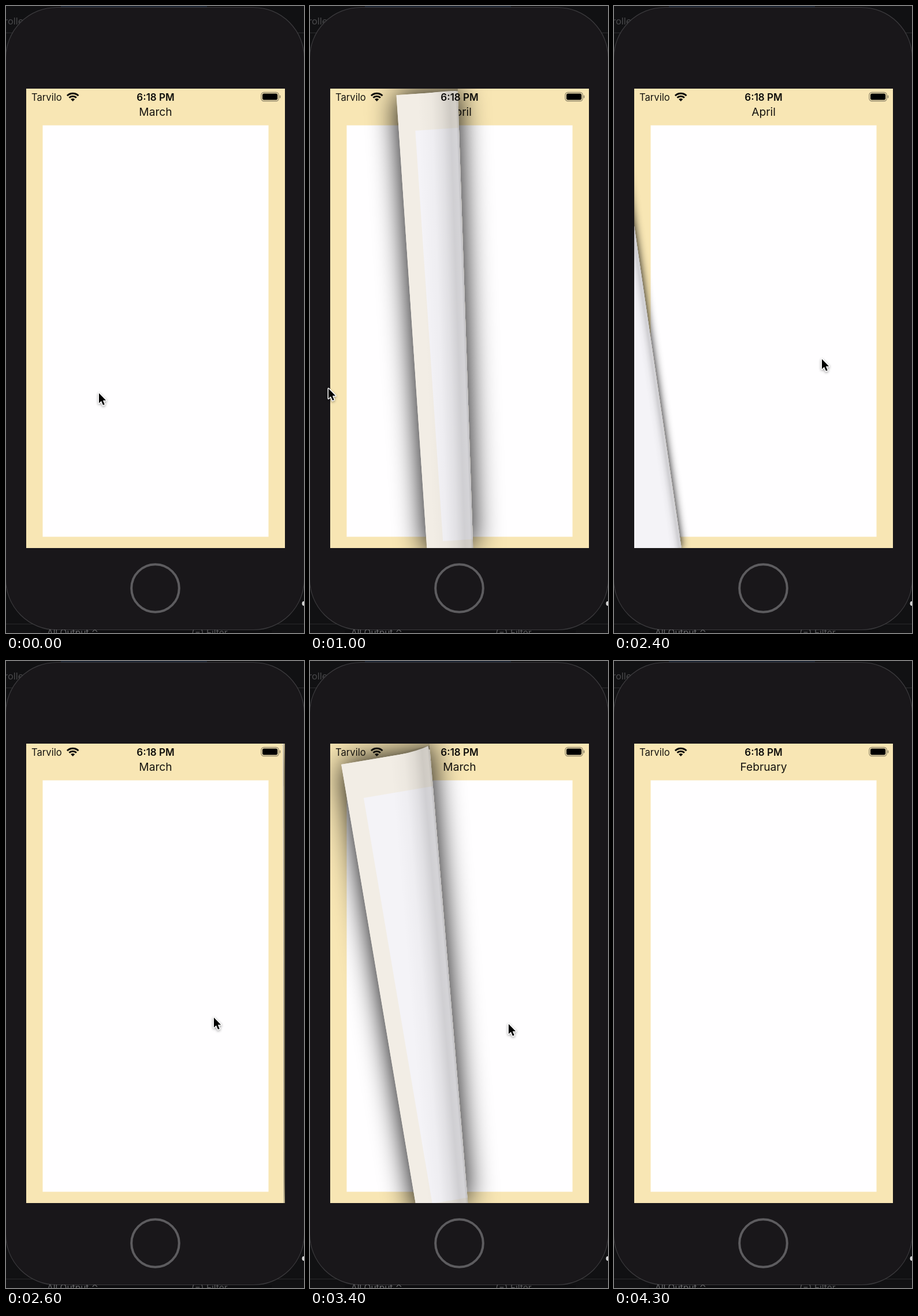
An HTML page with a canvas for the animation above (4800 ms loop, 516 by 1085 pixels).

```html
<!DOCTYPE html>
<html lang="en">
<head>
<meta charset="utf-8">
<title>Page turning</title>
<style>
html, body { margin: 0; width: 100%; height: 100%; overflow: hidden; background: #19181b; }
canvas { display: block; }
</style>
</head>
<body>
<canvas id="stage" width="516" height="1085"></canvas>
<script>
const ctx = document.getElementById('stage').getContext('2d');
const LOOP = 4800, STEP = 100;
const SCREEN = { x: 35, y: 143, w: 448, h: 795 };
const RIGHT = SCREEN.x + SCREEN.w, BOTTOM = SCREEN.y + SCREEN.h;
const FONT = 'Inter, Roboto, sans-serif';
const INK = '#0c0b09', PAPER = '#f2ede5';

// The crease starts at x = from and moves by speed and accel per step;
// its slant grows with the distance from the right edge.
const TURNS = [
  { at: 800, left: 'March', right: 'April', end: 'April', from: 429, speed: -40, accel: -20, tilt: 0.125 },
  { at: 2400, left: 'March', right: 'April', end: 'March', from: 58.5, speed: 211, accel: 0, tilt: 0.275 },
  { at: 3300, left: 'February', right: 'March', end: 'February', from: 29, speed: 211, accel: 0, tilt: 0.275 }
];

// pointer stops: time, x, y
const STOPS = [
  [0, 161, 670], [400, 340, 677], [700, 340, 677], [1000, 32, 662], [1300, 38, 664],
  [1400, 172.5, 640], [1500, 198, 597], [1700, 45, 658], [1900, 45, 658], [2300, 437, 612],
  [2400, 360, 611], [2600, 360, 617], [3000, 58, 600], [3600, 444, 638], [3800, 437, 638],
  [3900, 437, 638], [4300, 300, -60], [LOOP, 300, -60]
];

const ease = k => k * k * (3 - 2 * k);
const clamp = (v, lo, hi) => Math.max(lo, Math.min(hi, v));

function rect(color, x, y, w, h) {
  ctx.fillStyle = color;
  ctx.fillRect(x, y, w, h);
}

function round(x, y, w, h, r) {
  ctx.beginPath();
  ctx.roundRect(x, y, w, h, r);
}

function circle(x, y, r) {
  ctx.beginPath();
  ctx.arc(x, y, r, 0, 7);
}

function fill(color) {
  ctx.fillStyle = color;
  ctx.fill();
}

function stroke(color, width) {
  ctx.strokeStyle = color;
  ctx.lineWidth = width;
  ctx.stroke();
}

function text(str, x, y, size, color, align = 'left', weight = 400) {
  ctx.font = `${weight} ${size}px ${FONT}`;
  ctx.textAlign = align;
  ctx.fillStyle = color;
  ctx.fillText(str, x, y);
}

function poly(points) {
  ctx.beginPath();
  points.forEach(([x, y]) => ctx.lineTo(x, y));
  ctx.closePath();
}

function clipped(points, draw) {
  ctx.save();
  poly(points);
  ctx.clip();
  draw();
  ctx.restore();
}

function setShadow(alpha, blur) {
  ctx.shadowColor = `rgba(0,0,0,${alpha})`;
  ctx.shadowBlur = blur;
}

function drawPhone() {
  rect('#111113', 0, 0, 516, 1085);
  rect('#182230', 95, 0, 253, 2);
  text('rolle', -3, 32, 16.5, '#48484a');
  rect('#2c2c2e', 0, 46, 516, 1);
  rect('#29292b', 0, 1069, 516, 1);
  round(-0.5, 2.5, 517, 1077, 88);
  fill('#19171a');
  stroke('#3c3b3e', 1.2);

  clipped([[60, 1079], [460, 1079], [460, 1085], [60, 1085]], () => {
    rect('#0d0d0f', 60, 1080, 400, 5);
    text('All Output ⌃', 71, 1090, 15.5, '#69696b');
    text('(=) Filter', 321, 1090, 15.5, '#58585a');
  });

  circle(516.5, 1034, 4);
  fill('#d8d8d8');
  circle(258.5, 1007.5, 41.3);
  stroke('#5d5c5f', 4);
}

function drawSheet(paper, inner) {
  rect(paper, SCREEN.x, SCREEN.y, SCREEN.w, SCREEN.h);
  rect(inner, 63.5, 206.5, 391, 712);
}

function drawPage(title) {
  drawSheet('#f8e6b4', '#fffeff');
  text(title, 259, 190, 19.2, '#15130f', 'center');
}

function drawTurn(turn, mean) {
  const slant = turn.tilt * (RIGHT - mean);
  const top = mean - slant / 2, bottom = mean + slant / 2;
  const lift = Math.min(121, (RIGHT - mean) * 0.85);
  const spread = clamp(mean * 0.25, 6, 50);
  const blur = Math.min(50, (RIGHT - mean) * 0.25);
  const angle = Math.atan2(slant, SCREEN.h);
  const s = Math.sin(angle), c = Math.cos(angle);
  const side = x => [[x, SCREEN.y], [top, SCREEN.y], [bottom, BOTTOM], [x, BOTTOM]];
  const leftSide = side(-900), rightSide = side(1400);

  clipped(rightSide, () => {
    drawPage(turn.right);
    setShadow(1, spread);
    poly(leftSide);
    fill(PAPER);
  });

  clipped(leftSide, () => {
    drawPage(turn.left);

    // mirror the sheet across a line parallel to the crease
    const px = top + lift / 2, py = SCREEN.y;
    const a = 2 * s * s - 1, b = 2 * s * c, d = 2 * c * c - 1;
    ctx.save();
    ctx.transform(a, b, b, d, px - a * px - b * py, py - b * px - d * py);
    setShadow(Math.min(1, blur / 50), blur);
    rect(PAPER, SCREEN.x, SCREEN.y, SCREEN.w, SCREEN.h);
    setShadow(0, 0);
    drawSheet(PAPER, '#f4f3f7');
    ctx.restore();

    // the top edge bends up where it rolls into the crease
    const edgeY = x => py + (px - x) * Math.tan(2 * angle);
    if (lift > 100) {
      ctx.beginPath();
      ctx.moveTo(top - 50, edgeY(top - 50));
      ctx.quadraticCurveTo(top - 20, edgeY(top - 20) - 1, top - 2, SCREEN.y + 4);
      ctx.lineTo(top + 4, SCREEN.y + 32);
      ctx.lineTo(top - 30, edgeY(top - 30) + 8);
      fill(PAPER);
    }

    // roll shading, on the underside only
    const corner = [px + a * (RIGHT - px), py + b * (RIGHT - px)];
    const under = [
      corner, [top - 2, SCREEN.y + 4], [top + 20, SCREEN.y], [bottom + 20, BOTTOM],
      [corner[0] + b * 900, corner[1] + d * 900]
    ];
    clipped(under, () => {
      const width = spread * 1.4;
      const g = ctx.createLinearGradient(top, SCREEN.y, top - c * width, SCREEN.y + s * width);
      [[0, 0.22], [0.06, 0.13], [0.2, 0.15], [0.4, 0.08], [0.65, 0.025], [1, 0]]
        .forEach(([at, alpha]) => g.addColorStop(at, `rgba(0,0,0,${alpha})`));
      rect(g, SCREEN.x, SCREEN.y, SCREEN.w, SCREEN.h);
    });
  });
}

function drawStatus() {
  text('Tarvilo', 44, 164, 16.6, '#15130f');
  text('6:18 PM', 259, 164, 17, INK, 'center', 600);

  const fan = r => {
    ctx.beginPath();
    ctx.arc(115.7, 165, r, -Math.PI * 0.75, -Math.PI * 0.25);
  };
  [13.8, 8.8].forEach(r => { fan(r); stroke(INK, 3); });
  fan(5);
  ctx.lineTo(115.7, 165);
  fill(INK);

  round(442, 149.5, 30.2, 15, 4.5);
  stroke('#948a6d', 1.4);
  round(444, 151.5, 26.2, 11, 2.7);
  fill('#000');
  round(473.6, 154.5, 1.8, 5, 1);
  fill('#948a6d');
}

function drawPointer(t) {
  const i = STOPS.findIndex(p => p[0] > t);
  const [t0, x0, y0] = STOPS[i - 1], [t1, x1, y1] = STOPS[i];
  const k = ease((t - t0) / (t1 - t0));
  ctx.save();
  ctx.translate(x0 + (x1 - x0) * k, y0 + (y1 - y0) * k);
  poly([[0, 0], [0, 17.2], [4, 13.5], [7, 20.6], [9.8, 19.4], [6.8, 12.5], [12.2, 12.5]]);
  ctx.lineJoin = 'round';
  setShadow(0.4, 4);
  ctx.shadowOffsetY = 1.5;
  stroke('#fff', 3);
  setShadow(0, 0);
  fill('#000');
  ctx.restore();
}

function drawScreen(t) {
  let title = 'March', active = null, crease = 0;
  for (const turn of TURNS) {
    const k = (t - turn.at) / STEP;
    if (k < 0) break;
    const x = turn.from + turn.speed * k + turn.accel * k * k;
    if (x > -20 && x < RIGHT - 1) {
      active = turn;
      crease = x;
    } else title = turn.end;
  }
  ctx.save();
  ctx.beginPath();
  ctx.rect(SCREEN.x, SCREEN.y, SCREEN.w, SCREEN.h);
  ctx.clip();
  if (active) drawTurn(active, crease);
  else drawPage(title);
  drawStatus();
  ctx.restore();
}

const start = performance.now();

function frame() {
  const t = Math.floor(((performance.now() - start) % LOOP) / STEP) * STEP;
  drawPhone();
  drawScreen(t);
  drawPointer(t);
  requestAnimationFrame(frame);
}
frame();
</script>
</body>
</html>
```
